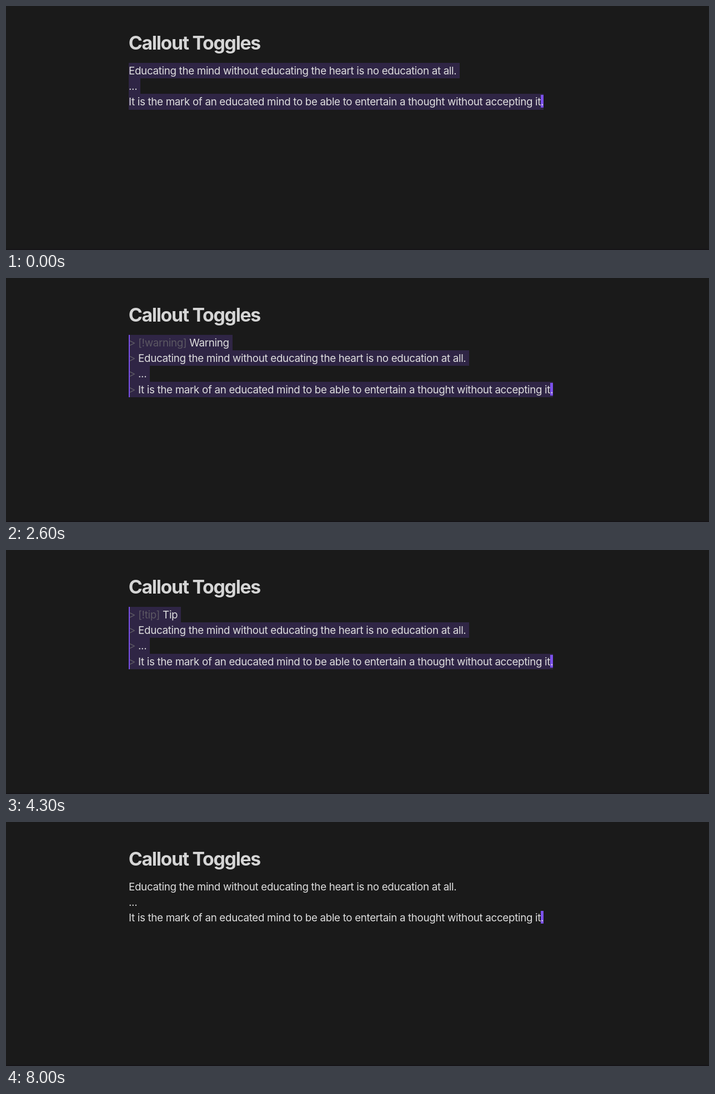
An HTML page that plays this animation: 1266 px wide and 442 px high, repeating every 8300 ms.

```html
<!DOCTYPE html>
<html lang="en">
<head>
<meta charset="utf-8">
<title>Callout Toggles</title>
<style>
html, body { margin: 0; width: 100%; height: 100%; overflow: hidden; background: #1a1a1a; }
body {
  position: relative;
  font: 18.8px/28.2px Inter, sans-serif;
  font-optical-sizing: none;
  letter-spacing: -.333px;
  white-space: pre;
  color: #dfdfdf;
}
h1 {
  position: absolute; left: 220.8px; top: 46.7px; margin: 0;
  font-size: 33.8px; line-height: 40px; letter-spacing: -1.3px; color: #d5d5d5;
}
footer { position: absolute; left: 0; right: 0; bottom: 0; height: 2px; background: #161417; }
#editor { position: absolute; left: 221px; top: 103px; line-height: 30.2px; }
#editor div { width: fit-content; height: 28.2px; }
.selected div { background: #2f2545; padding-right: 6px; }
.selected div:last-child { padding-right: 0; }
.quoted::before {
  content: ""; position: absolute; left: 0; top: 0; bottom: 0; width: 2.4px; background: #7b50ea;
}
.mark { color: #5c5863; }
.cursor { padding-top: 1px; background: linear-gradient(#7b50ea 0 0) 0 0 / 100% 23px no-repeat; }
#callout {
  position: absolute; left: 221px; top: 104.5px; width: 824px; height: 175px; border-radius: 4px;
}
#callout svg {
  position: absolute; left: 28.3px; top: 15.9px; width: 21.15px; height: 21.15px;
  fill: none; stroke: currentColor; stroke-width: 1.75; stroke-linecap: round; stroke-linejoin: round;
}
#callout b { position: absolute; left: 54.3px; top: 12.9px; font-weight: 600; letter-spacing: -.48px; }
#callout p { position: absolute; left: 28.2px; top: 58.9px; margin: 0; color: #dfdfdf; }
</style>
</head>
<body><h1>Callout Toggles</h1><div id="editor"></div><div id="callout"></div><footer></footer>
<script>
const LOOP = 8300;
const LINES = [
  "Educating the mind without educating the heart is no education at all.",
  "...",
  "It is the mark of an educated mind to be able to entertain a thought without accepting it."
];
const KINDS = {
  quote: {
    label: "Quote", color: "#929292", fill: "#242424",
    icon: "M3 21c3 0 7-1 7-8V5c0-1.25-.756-2.017-2-2H4c-1.25 0-2 .75-2 1.972V11c0 1.25.75 2 2 2 1 0 1 0 1 1v1c0 1-1 2-2 2s-1 .008-1 1.031V20c0 1 0 1 1 1z" +
      "M15 21c3 0 7-1 7-8V5c0-1.25-.757-2.017-2-2h-4c-1.25 0-2 .75-2 1.972V11c0 1.25.75 2 2 2h.75c0 2.25.25 4-2.75 4v3c0 1 0 1 1 1z"
  },
  warning: {
    label: "Warning", color: "#da8b46", fill: "#2d241c",
    icon: "m21.73 18-8-14a2 2 0 0 0-3.48 0l-8 14A2 2 0 0 0 4 21h16a2 2 0 0 0 1.73-3ZM12 9v4M12 17h.01"
  },
  tip: {
    label: "Tip", color: "#53dfdd", fill: "#202e2e",
    icon: "M8.5 14.5A2.5 2.5 0 0 0 11 12c0-1.38-.5-2-1-3-1.072-2.143-.224-4.054 2-6 .5 2.5 2 4.9 4 6.5 2 1.6 3 3.5 3 5.5a7 7 0 1 1-14 0c0-1.153.433-2.294 1-3a2.5 2.5 0 0 0 2.5 2.5z"
  }
};
// [start in ms, view, callout kind]
const STEPS = [
  [0, "selected"],
  [400, "source", "quote"], [700, "callout", "quote"], [1800, "source", "quote"],
  [2100, "selected"],
  [2300, "source", "warning"], [2700, "callout", "warning"], [3700, "source", "warning"],
  [4000, "selected"],
  [4200, "source", "tip"], [4600, "callout", "tip"], [5800, "source", "tip"],
  [6000, "selected"],
  [6500, "plain"], [7100, "blink"], [7700, "plain"]
];

const editor = document.getElementById("editor");
const callout = document.getElementById("callout");
const mark = text => `<span class="mark">${text}</span>`;

function showEditor(view, kind) {
  const lines = [...LINES];
  if (view !== "blink") lines[2] = lines[2].replace(/\.$/, '<span class="cursor">.</span>');
  if (kind) lines.unshift(mark(`[!${kind}]`) + " " + KINDS[kind].label);
  const prefix = kind ? mark("&gt; ") : "";
  editor.className = (view === "selected" || kind ? "selected " : "") + (kind ? "quoted" : "");
  editor.innerHTML = lines.map(line => `<div>${prefix}${line}</div>`).join("");
}

function showCallout(kind) {
  const { label, color, fill, icon } = KINDS[kind];
  callout.style.color = color;
  callout.style.background = fill;
  callout.innerHTML =
    `<svg viewBox="0 0 24 24"><path d="${icon}"/></svg><b>${label}</b><p>${LINES.join("\n")}</p>`;
}

let current;
function draw() {
  const time = performance.now() % LOOP;
  const step = STEPS.findLast(([start]) => start <= time);
  if (step !== current) {
    current = step;
    const [, view, kind] = step;
    const rendered = view === "callout";
    editor.hidden = rendered;
    callout.hidden = !rendered;
    if (rendered) showCallout(kind);
    else showEditor(view, kind);
  }
  requestAnimationFrame(draw);
}
draw();
</script>
</body>
</html>
```
